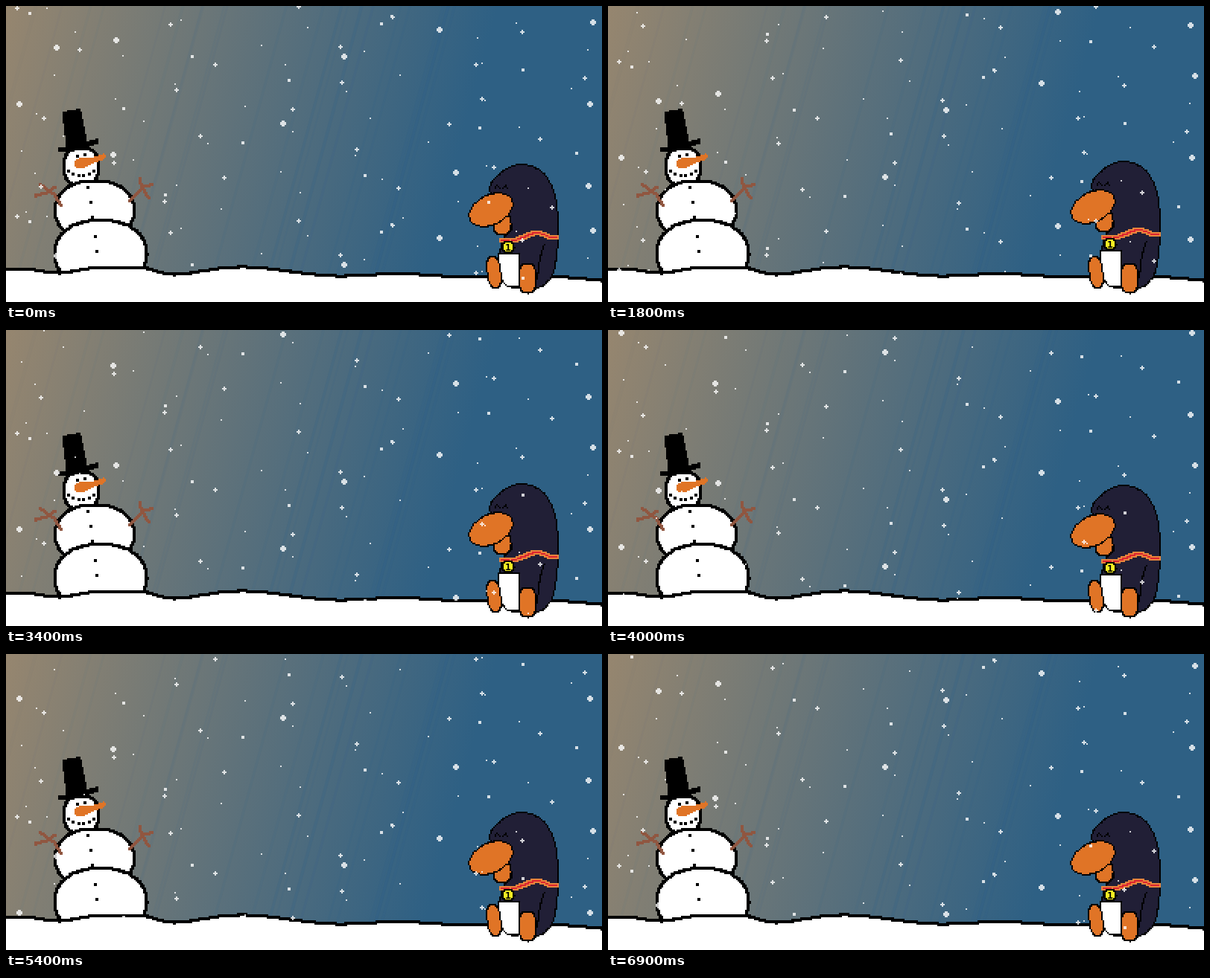
Recreate the animation shown at these times as an HTML page with a canvas. Size 800x398 px, loop 7000 ms.

```html
<!DOCTYPE html>
<html lang="en">
<head>
<meta charset="utf-8">
<title>Snowman and penguin</title>
<style>
html, body { margin: 0; width: 100%; height: 100%; overflow: hidden; background: #2e6084; }
canvas { display: block; }
</style>
</head>
<body>
<canvas id="stage" width="800" height="398"></canvas>
<script>
const ctx = document.getElementById('stage').getContext('2d');
const snap = v => 2 * Math.round(v / 2);
const clamp = (v, lo, hi) => Math.min(hi, Math.max(lo, v));
const points = text => text.split(' ').map(s => s.split(',').map(Number));

function seeded(seed) {
  return () => (seed = (seed * 16807) % 2147483647) / 2147483647;
}

// Smooth run through a few key points
function curve(text, closed) {
  const p = points(text), n = p.length, out = [];
  const at = i => closed ? p[(i + n) % n] : p[clamp(i, 0, n - 1)];
  for (let i = 0; i < (closed ? n : n - 1); i++) {
    const [a, b, c, d] = [at(i - 1), at(i), at(i + 1), at(i + 2)];
    for (let t = 0; t < 1; t += 0.125) {
      out.push([0, 1].map(j => b[j] + t / 2 * (c[j] - a[j] +
        t * (2 * a[j] - 5 * b[j] + 4 * c[j] - d[j] + t * (3 * (b[j] - c[j]) + d[j] - a[j])))));
    }
  }
  if (!closed) out.push(p[n - 1]);
  return out;
}

// Superellipse: a power above 2 makes it boxier
function oval(cx, cy, rx, ry, power = 2, tilt = 0) {
  const bulge = v => Math.sign(v) * Math.abs(v) ** (2 / power);
  const cos = Math.cos(tilt), sin = Math.sin(tilt);
  return Array.from({ length: 80 }, (_, i) => {
    const x = rx * bulge(Math.cos(i * Math.PI / 40)), y = ry * bulge(Math.sin(i * Math.PI / 40));
    return [cx + x * cos - y * sin, cy + x * sin + y * cos];
  });
}

// Fills in blocks of two pixels, without soft edges
function fill(pts, color) {
  ctx.fillStyle = color;
  for (let y = 0; y < 398; y += 2) {
    const xs = [];
    pts.forEach(([x1, y1], i) => {
      const [x2, y2] = pts[(i + 1) % pts.length];
      if ((y1 <= y + 1) !== (y2 <= y + 1)) xs.push(x1 + (y + 1 - y1) * (x2 - x1) / (y2 - y1));
    });
    xs.sort((a, b) => a - b);
    for (let i = 0; i + 1 < xs.length; i += 2) {
      ctx.fillRect(snap(xs[i]), y, snap(xs[i + 1]) - snap(xs[i]), 2);
    }
  }
}

function stroke(pts, color, w) {
  ctx.fillStyle = color;
  for (let i = 0; i + 1 < pts.length; i++) {
    const [x, y] = pts[i], dx = pts[i + 1][0] - x, dy = pts[i + 1][1] - y;
    const steps = Math.max(1, Math.ceil(Math.max(Math.abs(dx), Math.abs(dy)) / 2));
    for (let s = 0; s <= steps; s++) {
      ctx.fillRect(snap(x + dx * s / steps - w / 2), snap(y + dy * s / steps - w / 2), w, w);
    }
  }
}

function shape(pts, color, w) {
  fill(pts, color);
  stroke([...pts, pts[0]], '#000', w);
}

function dot(x, y, size = 4) {
  ctx.fillStyle = '#000';
  ctx.fillRect(snap(x - size / 2), snap(y - size / 2), size, size);
}

function sky() {
  const g = ctx.createLinearGradient(0, 0, 615, 166);
  g.addColorStop(0, '#96866f');
  g.addColorStop(0.47, '#657479');
  g.addColorStop(1, '#2e6084');
  ctx.fillStyle = g;
  ctx.fillRect(0, 0, 800, 398);
  const random = seeded(7);
  for (let i = 0; i < 24; i++) {
    const x = 40 + 600 * random();
    ctx.lineWidth = 2 + 3 * random();
    ctx.strokeStyle = `rgba(40,92,140,${0.02 + x / 8000})`;
    ctx.beginPath();
    ctx.moveTo(x, 0);
    ctx.lineTo(x - 108, 398);
    ctx.stroke();
  }
}

function snowman() {
  shape(oval(101, 216, 23, 25, 2.6), '#fff', 4);
  shape(oval(119, 275, 53, 40, 2.2), '#fff', 4);
  shape(oval(127, 333, 62, 45, 2.2), '#fff', 4);
  fill(points('75,142 100,138 109,182 124,178 124,185 86,197 70,197 70,190 81,190'), '#000');
  dot(96, 202);
  dot(106, 200);
  for (let i = 0; i < 6; i++) dot(84 + 6.8 * i, 222 + 6 * Math.sin(i * Math.PI / 5));
  for (let i = 0; i < 5; i++) dot(110 + 3 * i, 244 + 20 * i + (i > 2 ? 6 : 0));
  fill(curve('92,209 98,205 118,203 132,199 132,206 116,212 104,218 94,218', true), '#e07426');
  for (const twig of ['74,268 65,254 46,240', '39,255 58,250', '60,248 66,243',
                      '166,261 184,243 195,240', '180,232 182,246', '184,246 191,257']) {
    stroke(points(twig), '#905640', 4);
  }
}

function ground() {
  const top = curve('-8,355 30,354 72,359 120,352 182,352 215,360 240,360 295,352 340,352 ' +
    '415,361 455,363 530,360 610,364 735,364 808,370');
  fill([...top, [808, 400], [-8, 400]], '#fff');
  stroke(top, '#000', 4);
}

// The upper body breathes by `lift`, the seat stays on the ground
function penguin(lift) {
  const bend = pts => pts.map(([x, y]) => [x, y + lift * clamp((374 - y) / 40, 0, 1)]);
  const navy = '#211f36', orange = '#e07426';
  shape(bend(curve('650,250 662,226 690,213 718,222 735,248 741,290 739,335 732,364 710,380 ' +
    '670,374 662,345 668,312 678,295', true)), navy, 2);
  stroke(bend(curve('723,320 717,338 714,358 711,372')), '#000', 2);
  shape(bend(points('661,333 689,333 689,378 672,376 662,362')), '#fff', 2);
  shape(bend(oval(666, 293, 12, 14, 3)), orange, 2);
  shape(bend(oval(651, 274, 31, 20, 2, -0.45)), orange, 2);
  for (const x of [656, 667]) stroke(bend(points(`${x},244 ${x + 3},241 ${x + 6},244`)), '#000', 2);
  const ribbon = bend(curve('664,314 678,316 694,311 712,305 728,310 739,311'));
  stroke(ribbon, '#e8843c', 6);
  stroke(ribbon, '#dd2430', 2);
  shape(bend(oval(674, 324, 8, 8, 2.3)), '#f7ee22', 2);
  ctx.fillStyle = '#000';
  ctx.font = 'bold 13px "DejaVu Sans Mono", monospace';
  ctx.textAlign = 'center';
  ctx.fillText('1', 674, 329 + lift);
  shape(oval(655, 358, 9, 21, 2.6, -0.12), orange, 2);
  shape(oval(700, 366, 11, 20, 2.8), orange, 2);
}

// Each flake is a few blocks around its centre
const square = s => [[-s / 2, -s / 2, s, s]];
const disc = [[-2, -4, 4, 8], [-4, -2, 2, 4], [2, -2, 2, 4]];
const cross = [[-1, -3, 2, 6], [-3, -1, 2, 2], [1, -1, 2, 2]];
const random = seeded(2024);

// Even spread in x by the golden ratio, shuffled rows in y
function scatter(count, blocks, odd) {
  return Array.from({ length: count }, (_, i) => ({
    x: snap(12 + 776 * ((i * 0.618 + 0.1 * random()) % 1)) + odd,
    y: snap(288 * (i + random()) / count) + odd,
    blocks
  }));
}

const flakes = [
  ...points('68,56 148,46 18,132 144,200 372,158 454,68 582,32 788,22 784,132 782,242 604,224')
    .map(([x, y]) => ({ x, y, blocks: disc })),
  ...scatter(26, cross, 1),
  ...scatter(12, square(4), 0),
  ...scatter(44, square(2), 1)
];

function snow(step) {
  const fall = 4 * step + 2 * Math.max(0, Math.floor((step - 54) / 5));
  ctx.fillStyle = 'rgba(255,255,255,0.8)';
  for (const { x, y, blocks } of flakes) {
    for (const copy of [-288, 0, 280]) {
      for (const [dx, dy, w, h] of blocks) ctx.fillRect(x + dx, y + fall + copy + dy, w, h);
    }
  }
}

let shown = -1;
function frame() {
  const step = Math.floor(performance.now() / 100) % 70;
  if (step !== shown) {
    shown = step;
    sky();
    snowman();
    ground();
    penguin(-2 * clamp(Math.floor(Math.min(step, 60 - step) / 7), 0, 3));
    snow(step);
  }
  requestAnimationFrame(frame);
}
frame();
</script>
</body>
</html>
```
